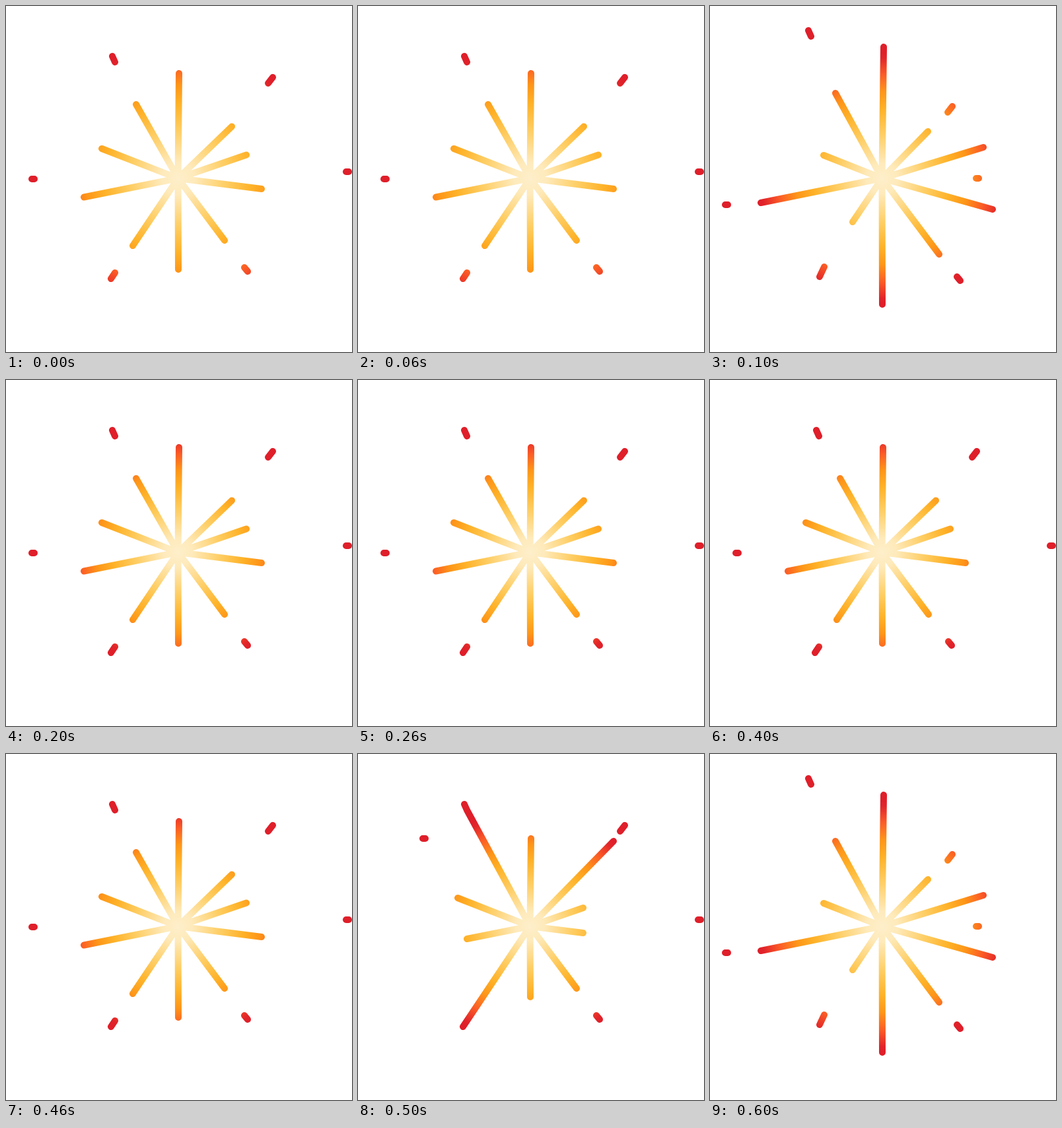
Recreate the animation shown at these times as an HTML page. Size 524 by 524 pixels, loop 700 ms.

```html
<!DOCTYPE html>
<html lang="en">
<head>
<meta charset="utf-8">
<title>Spark burst</title>
<style>
  html, body { margin: 0; width: 100%; height: 100%; overflow: hidden; background: #fff; }
  svg { display: block; width: 100vw; height: 100vh; }
  path { fill: none; stroke-width: 10; stroke-linecap: round; stroke-linejoin: round; }

  .pose { visibility: hidden; animation: 700ms step-end infinite; }
  .glow   { stroke: url(#wide);   animation-name: glow; }
  .even   { stroke: url(#narrow); animation-name: even; }
  .tall   { stroke: url(#medium); animation-name: tall; }
  .cross  { stroke: url(#narrow); animation-name: cross; }

  /* Seven equal steps: glow, tall, even, cross, even, cross, tall */
  @keyframes glow {
    0% { visibility: visible; }
    14.285%, 100% { visibility: hidden; }
  }
  @keyframes tall {
    0%, 28.571% { visibility: hidden; }
    14.285%, 85.714%, 100% { visibility: visible; }
  }
  @keyframes even {
    0%, 42.857%, 71.428%, 100% { visibility: hidden; }
    28.571%, 57.142% { visibility: visible; }
  }
  @keyframes cross {
    0%, 57.142%, 85.714%, 100% { visibility: hidden; }
    42.857%, 71.428% { visibility: visible; }
  }
</style>
</head>
<body>
<svg viewBox="0 0 524 524">
  <defs>
    <radialGradient id="heat" gradientUnits="userSpaceOnUse" cx="260.5" cy="261" r="190">
      <stop offset="0" stop-color="#feefcb"/>
      <stop offset=".12" stop-color="#feeabb"/>
      <stop offset=".36" stop-color="#fecd62"/>
      <stop offset=".55" stop-color="#feb228"/>
      <stop offset=".69" stop-color="#fe9518"/>
      <stop offset=".83" stop-color="#fb5b26"/>
      <stop offset=".96" stop-color="#e1242a"/>
      <stop offset="1" stop-color="#df1f2a"/>
    </radialGradient>
    <radialGradient id="wide" href="#heat" r="205"/>
    <radialGradient id="medium" href="#heat" r="190"/>
    <radialGradient id="narrow" href="#heat" r="180"/>

    <g id="evenBurst">
      <path d="M262 102L260.5 261L261 399M197 149L260.5 261L331 355M145 216L260.5 261L387 277
               M118 289.5L260.5 261L364 225.5M192 363L260.5 261L342 182.5"/>
      <path d="M161 76l4 9M404 108l-7 9M39 262h4M515 251h4M165 404l-6 9M361 396l5 6"/>
    </g>
  </defs>

  <use class="pose glow" href="#evenBurst"/>
  <use class="pose even" href="#evenBurst"/>

  <g class="pose tall">
    <path d="M263 62L260.5 261L261 452M190 132L260.5 261L347 376M172 226L260.5 261L428 308
             M77 298L260.5 261L414 214M216 327L260.5 261L330 190"/>
    <path d="M149 37l4 9M367 152l-7 9M23 301h4M403 261h4M173 395l-7 15M374 410l5 6"/>
  </g>

  <g class="pose cross">
    <path d="M262 128L260.5 261L261 368M161 76l4 9L260.5 261L331 355M151 218L260.5 261L341 271
             M165 280L260.5 261L341 233M159 413L260.5 261L387 132"/>
    <path d="M98 128h4M404 108l-7 9M515 251h4M361 396l5 6"/>
  </g>
</svg>
</body>
</html>
```
